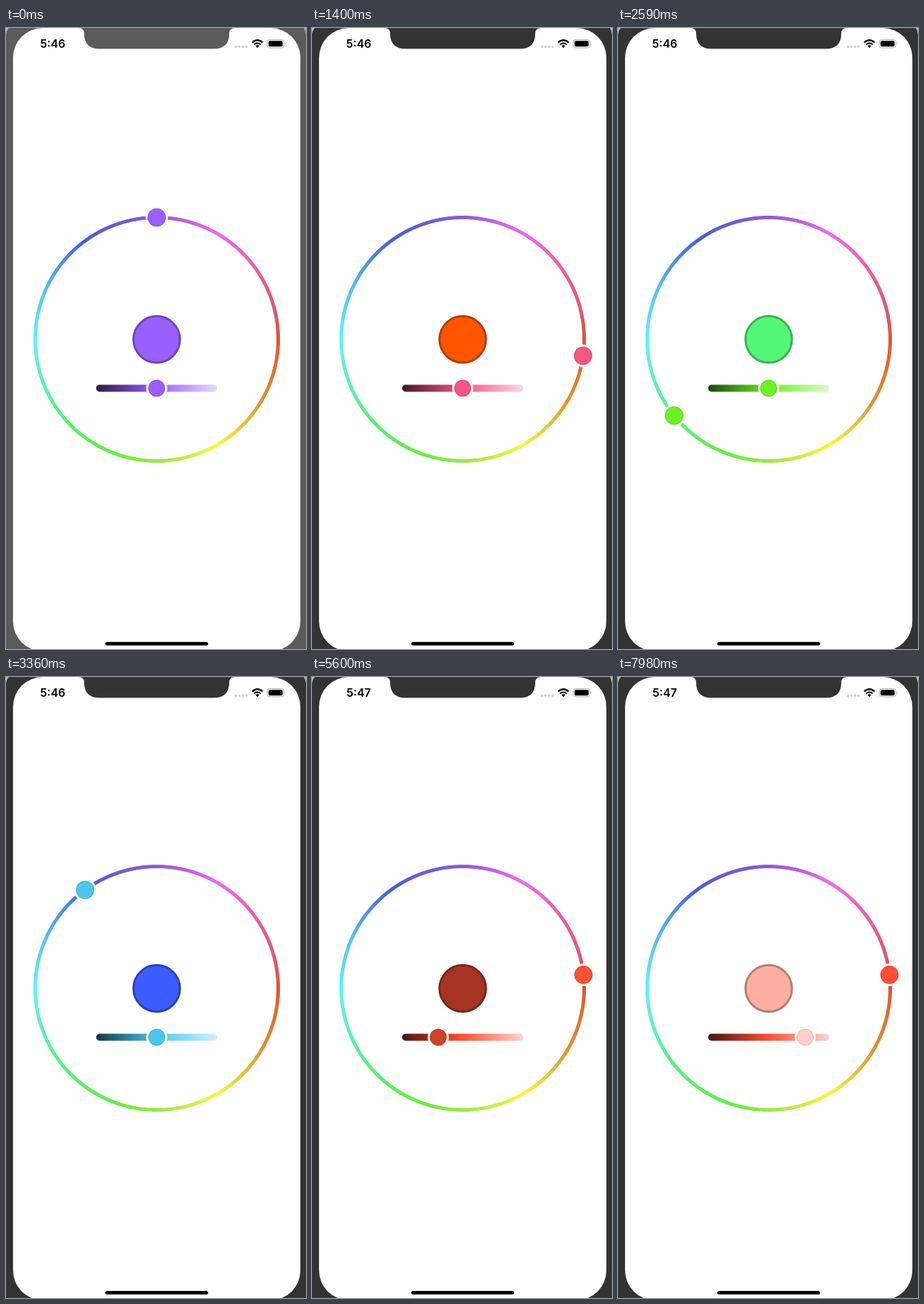
Write an HTML page that moves like this. It is 426 px wide and 880 px high and loops after 8 s.

```html
<!DOCTYPE html>
<html lang="en">
<head>
<meta charset="utf-8">
<title>Color wheel</title>
<style>
  html, body { margin: 0; width: 100%; height: 100%; overflow: hidden; background: #333; }
  .stage { position: relative; width: 426px; height: 880px; overflow: hidden; }
  .stage > * { position: absolute; left: 0; top: 0; }
  svg { display: block; }
  .bezel { fill: #333; animation: dim 8s linear infinite; }
  @keyframes dim { 0% { fill: #5b5b5b; } 5%, 100% { fill: #333; } }
  .time { font: 600 16px Inter, sans-serif; text-anchor: middle; }
  .stage > .wheel {
    left: 38px; top: 265px; width: 352px; height: 352px; border-radius: 50%;
    background: conic-gradient(from 90deg,
      #e8512a 0deg, #e0922e 30deg, #e8c838 46deg, #fbf73c 60deg, #a0e840 88deg,
      #62f03c 110deg, #58f080 141deg, #5ff5f5 180deg, #55c0f0 205deg, #4560d8 234deg,
      #9258e0 270deg, #f068f0 300deg, #ec5a98 330deg, #e05565 350deg, #e8512a 360deg);
    -webkit-mask: radial-gradient(circle, transparent 169.6px, #000 170.4px, #000 174.6px, transparent 175.4px);
    mask: radial-gradient(circle, transparent 169.6px, #000 170.4px, #000 174.6px, transparent 175.4px);
  }
  .edge { fill: none; stroke: #000; stroke-opacity: .12; }
</style>
</head>
<body>
<div class="stage">
  <svg width="426" height="880">
    <rect class="bezel" width="426" height="880"/>
    <path d="M0 0H4Q1 3 0 9ZM426 0H423Q425 3 426 9Z" fill="#b8b8b8"/>
    <rect x="10" width="408" height="883" rx="42" fill="#fff"/>
    <path class="bezel" d="M103 0Q111 0 111 8Q111 29.5 133 29.5H295Q317 29.5 317 8Q317 0 325 0Z"/>
    <text class="time" id="time" x="66.4" y="28">5:46</text>
    <g fill="#d2d2d2">
      <circle cx="326.7" cy="26.4" r="1.8"/><circle cx="331.6" cy="26.4" r="1.8"/>
      <circle cx="336.5" cy="26.4" r="1.8"/><circle cx="341.4" cy="26.4" r="1.8"/>
    </g>
    <g fill="none" stroke="#000" stroke-width="2.3">
      <path d="M349.6 20.6Q357 13.8 364.4 20.6M352.3 23.5Q357 19.2 361.7 23.5"/>
      <path d="M354.3 25.3Q357 23 359.7 25.3L357 28.2Z" fill="#000" stroke="none"/>
    </g>
    <rect x="371" y="16.6" width="23.6" height="11.4" rx="3.2" fill="none" stroke="#a8a8a8"/>
    <rect x="372.8" y="18.3" width="20" height="8" rx="1.8"/>
    <path d="M396 20.3Q397.8 22.3 396 24.3Z" fill="#a8a8a8"/>
    <rect x="141" y="870" width="146" height="5" rx="2.5"/>
  </svg>
  <div class="wheel"></div>
  <svg width="426" height="880">
    <defs>
      <linearGradient id="shades">
        <stop id="dark"/><stop id="pure" offset=".5"/><stop id="light" offset="1"/>
      </linearGradient>
    </defs>
    <circle id="swatch" cx="214" cy="441.3" r="33" stroke-width="3"/>
    <rect x="128" y="505.5" width="172" height="10" rx="5" fill="url(#shades)"/>
    <g id="hueKnob">
      <circle r="16" fill="#fff"/><circle id="hueDot" r="13"/><circle class="edge" r="12.5"/>
    </g>
    <g id="shadeKnob">
      <circle r="15" fill="#fff"/><circle id="shadeDot" r="12"/><circle class="edge" r="11.5"/>
    </g>
  </svg>
</div>
<script>
const LOOP = 8000, LAG = 270;
const CENTER = { x: 214, y: 441 }, RADIUS = 172.5, BAR_Y = 510.5, HALF_BAR = 86;
const el = id => document.getElementById(id);

// Knob paths as [ms, value] points.
const hueKeys = [[0, -90], [420, -88], [900, -45], [1400, 7.7], [2590, 141], [3360, 233.7],
  [3860, 320], [4180, 353.7]];
const shadeKeys = [[0, 214], [4950, 214], [5500, 185], [6150, 153], [6750, 153], [7200, 214],
  [7600, 284], [7760, 284], [7980, 266], [8000, 264]];

const hueStops = [[0, '#ff5014'], [8, '#ff5500'], [30, '#ff9d00'], [60, '#ffff38'], [90, '#a8f82c'],
  [110, '#6cf222'], [141, '#55f876'], [180, '#5cffff'], [203, '#48b8ea'], [234, '#3c5cff'],
  [270, '#9960ff'], [300, '#ff6cff'], [340, '#f4557f'], [354, '#ff5032'], [360, '#ff5014']];

const mix = (a, b, k) => a.map((v, i) => v + (b[i] - v) * k);
const css = c => `rgb(${c.map(Math.round)})`;
const rgb = hex => [1, 3, 5].map(i => parseInt(hex.slice(i, i + 2), 16));
const BLACK = [0, 0, 0], WHITE = [255, 255, 255];
const palette = hueStops.map(([deg, hex]) => [deg, rgb(hex)]);

function segment(keys, at) {
  let i = 0;
  while (i < keys.length - 2 && at >= keys[i + 1][0]) i++;
  const span = keys[i + 1][0] - keys[i][0];
  return { i, span, k: Math.min(1, Math.max(0, (at - keys[i][0]) / span)) };
}

// Smooth curve through the points, flat at turns and ends.
function slope(keys, i) {
  if (i === 0 || i === keys.length - 1) return 0;
  const rate = j => (keys[j + 1][1] - keys[j][1]) / (keys[j + 1][0] - keys[j][0]);
  const before = rate(i - 1), after = rate(i);
  return before * after <= 0 ? 0 : 2 * before * after / (before + after);
}

function curve(keys, t) {
  const { i, span, k } = segment(keys, t);
  const a = keys[i][1], b = keys[i + 1][1];
  const ease = k * k * (3 - 2 * k);
  return a + (b - a) * ease
    + span * k * (1 - k) * ((1 - k) * slope(keys, i) - k * slope(keys, i + 1));
}

function hueColor(deg) {
  const { i, k } = segment(palette, (deg + 360) % 360);
  return mix(palette[i][1], palette[i + 1][1], k);
}

function shade(color, x) {
  const u = (x - CENTER.x) / HALF_BAR;
  return u < 0 ? mix(color, BLACK, -u * .86) : mix(color, WHITE, u * .9);
}

function place(id, x, y) {
  el(id).setAttribute('transform', `translate(${x.toFixed(2)} ${y.toFixed(2)})`);
}

function draw(t) {
  const before = Math.max(0, t - LAG);
  const deg = curve(hueKeys, t), rad = deg * Math.PI / 180;
  const x = curve(shadeKeys, t);
  const picked = shade(hueColor(deg), x);
  const trailing = hueColor(curve(hueKeys, before));

  place('hueKnob', CENTER.x + RADIUS * Math.cos(rad), CENTER.y + RADIUS * Math.sin(rad));
  place('shadeKnob', x, BAR_Y);
  el('swatch').style.fill = css(picked);
  el('swatch').style.stroke = css(mix(picked, BLACK, .29));
  el('hueDot').style.fill = css(trailing);
  el('shadeDot').style.fill = css(shade(trailing, curve(shadeKeys, before)));
  el('dark').style.stopColor = css(mix(trailing, BLACK, .72));
  el('pure').style.stopColor = css(trailing);
  el('light').style.stopColor = css(mix(trailing, WHITE, .76));
  el('time').textContent = t < 3900 ? '5:46' : '5:47';
}

function tick() {
  draw(performance.now() % LOOP);
  requestAnimationFrame(tick);
}
tick();
</script>
</body>
</html>
```
